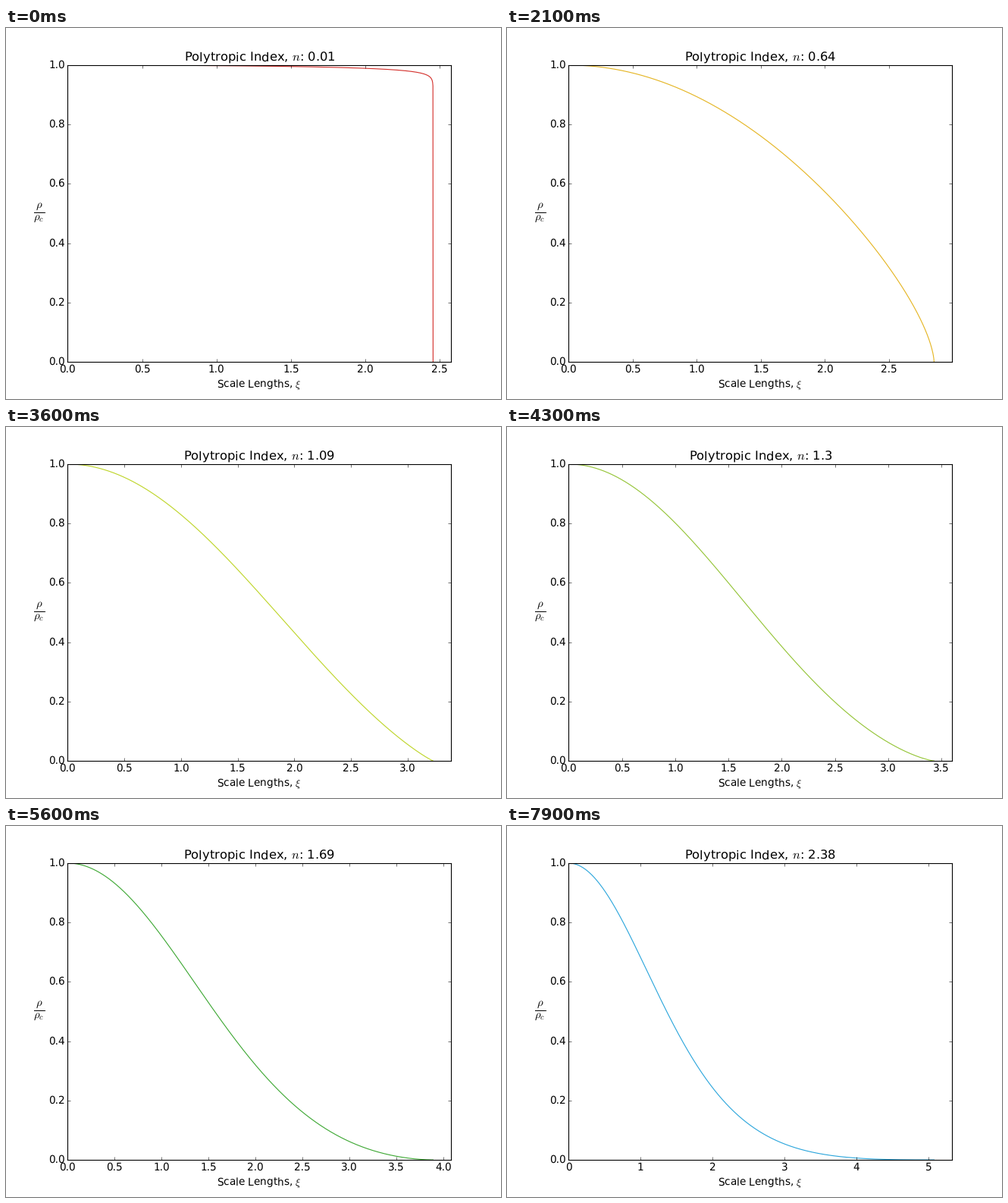
Animation, 653 px wide and 489 px high, one loop 8 s. Source, as a matplotlib script:

```python
import numpy as np
import matplotlib.pyplot as plt
from matplotlib.animation import FuncAnimation

W, H, DPI = 653, 489, 80
FRAMES, INTERVAL = 80, 100

plt.style.use("classic")
plt.rcParams.update({
    "font.family": "DejaVu Sans",
    "font.size": 12.24,
    "text.hinting": "none",
    "figure.facecolor": "white",
    "savefig.facecolor": "white",
    "savefig.dpi": "figure",
    "xtick.major.pad": 3.2,
    "ytick.major.pad": 3.2,
    "axes.labelpad": 3.4,
    "axes.titlepad": 4.6,
})

INDEX = 0.01 + 0.03 * np.arange(FRAMES)

# Line colour as a function of the polytropic index
COLOR_AT = [0.01, 0.40, 0.88, 1.30, 1.69, 1.96, 2.38]
COLORS = np.array([
    (212, 48, 44), (226, 132, 42), (232, 230, 26), (148, 196, 54),
    (62, 168, 52), (28, 156, 94), (44, 166, 220),
]) / 255


def line_color(n):
    return [np.interp(n, COLOR_AT, channel) for channel in COLORS.T]


def lane_emden(n, h=0.002, xi_max=5.4):
    """Integrate the Lane-Emden equation for all indices at once (RK4)."""
    def slope(x, y):
        theta, phi = y
        return np.array([-phi / x**2, x**2 * np.maximum(theta, 0) ** n])

    xi = np.arange(h, xi_max, h)
    y = np.array([np.full(n.shape, 1 - h**2 / 6), np.full(n.shape, h**3 / 3)])
    theta = [y[0]]
    for x in xi[:-1]:
        k1 = slope(x, y)
        k2 = slope(x + h / 2, y + h / 2 * k1)
        k3 = slope(x + h / 2, y + h / 2 * k2)
        k4 = slope(x + h, y + h * k3)
        y = y + h / 6 * (k1 + 2 * k2 + 2 * k3 + k4)
        theta.append(y[0])
    return xi, np.array(theta).T


def profile(xi, theta, n):
    """Density from the centre out to the surface, where theta is zero."""
    end = np.argmax(theta <= 0)
    t0, t1 = theta[end - 1], theta[end]
    surface = xi[end - 1] + (xi[end] - xi[end - 1]) * t0 / (t0 - t1)
    x = np.r_[0, xi[:end], surface]
    rho = np.r_[1, theta[:end] ** n, 0]
    return x, rho


xi, thetas = lane_emden(INDEX)
profiles = [profile(xi, theta, n) for theta, n in zip(thetas, INDEX)]

fig = plt.figure(figsize=(W / DPI, H / DPI), dpi=DPI)
ax = fig.add_axes([81.4 / W, 0.1, 0.775, 0.8])
ax.set_ylim(0, 1)
ax.set_xlabel(r"Scale Lengths, $\xi$")
fig.text(36.5 / W, 1 - 244 / H, r"$\frac{\rho}{\rho_c}$",
         size=19, ha="left", va="center")
title = ax.set_title("")
line, = ax.plot([], [], lw=1.02)


def update(i):
    x, rho = profiles[i]
    line.set_data(x, rho)
    line.set_color(line_color(INDEX[i]))
    ax.set_xlim(0, 1.05 * x[-1])
    title.set_text(f"Polytropic Index, $n$: {round(INDEX[i], 2):g}")
    return line, title


anim = FuncAnimation(fig, update, frames=FRAMES, interval=INTERVAL,
                     init_func=lambda: update(0), repeat=True, repeat_delay=0)
plt.show()
```
